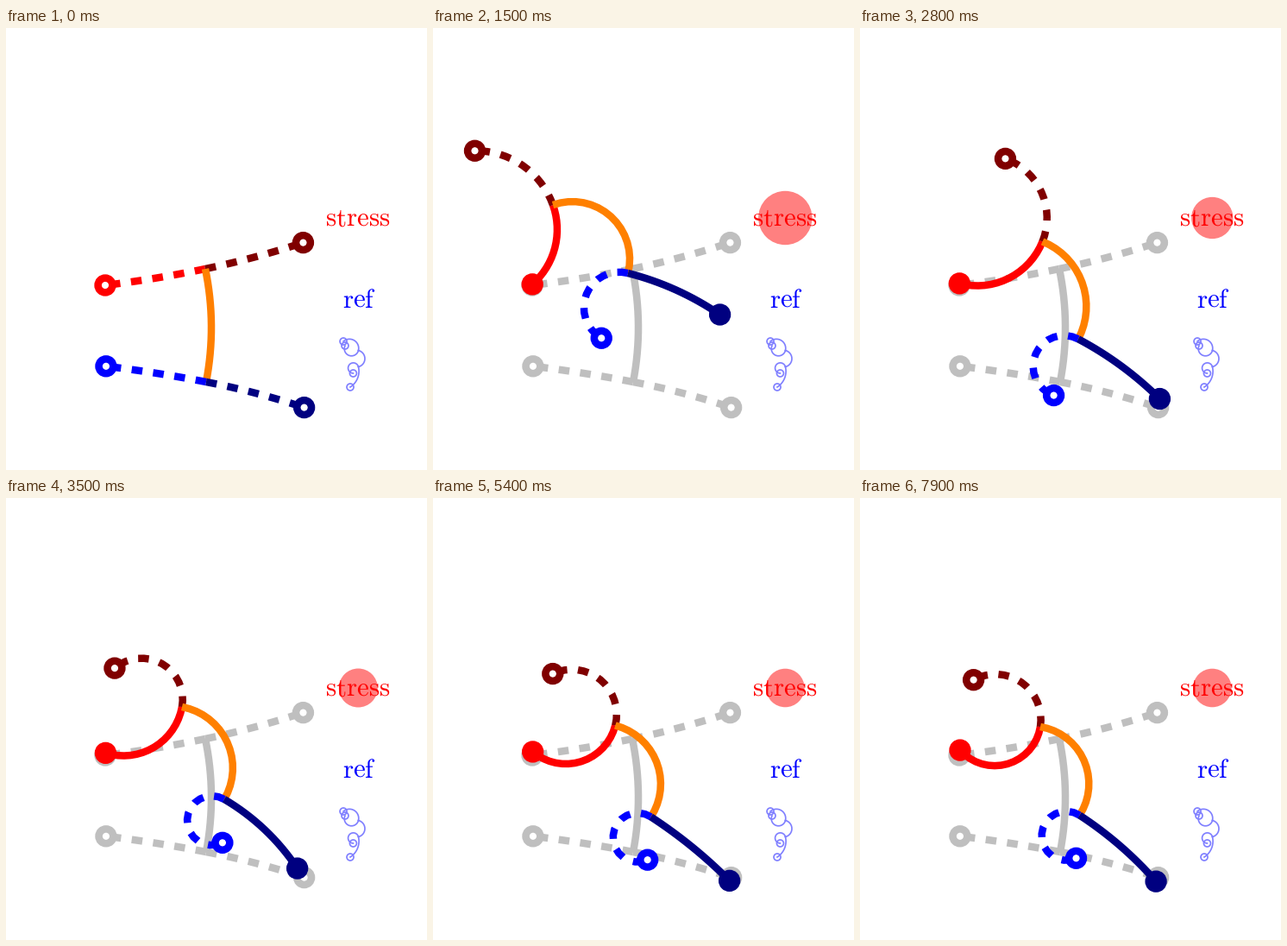
Animation, 488 px wide and 512 px high, one loop 8000 ms. Source, as a matplotlib script:

```python
import numpy as np
import matplotlib.pyplot as plt
from matplotlib.animation import FuncAnimation
from matplotlib.patches import Circle

W, H, DPI = 488, 512, 100
FRAMES, STEP = 80, 100
LOOP = FRAMES * STEP
PX = 72 / DPI
LIMB, LINE = 117.5, 8.5
DASH = (0, (1.47, 1.47))
GRAY = "#bfbfbf"
plt.rcParams.update({"mathtext.fontset": "cm", "text.hinting": "none"})

# Key poses: shoulder x, y, hip x, y, then the bends in degrees of the
# spine, front right, rear left and rear right limbs.
KEYS = {
    0: (231, 279, 232, 410, 22.7, -6.4, -4, 7.4),
    900: (228, 288, 245, 424, 55, 0, -122, 0),
    1500: (139, 205, 226, 284, 124, -71, -164, 20),
    2200: (218, 252, 253, 370, 84, -50, -148, 9),
    3500: (204, 242, 253, 349, 110, -141, -236, 26),
    4600: (212, 263, 252, 370, 107, -130, -237, 11),
    7900: (209, 265, 254.5, 367.5, 114, -128, -237, 15.6),
}
MINI = (408.5, 373.5, 408.5, 392.5, 153, -145, -255, 71)


def arc(start, angle, bend, length, n=16):
    """Points of a constant-curvature arc; angles in radians, y down."""
    s = np.linspace(0, 1, n + 1)
    turn = bend * s / 2
    chord = length * s * np.sinc(turn / np.pi)
    return (start[0] + chord * np.cos(angle + turn),
            start[1] + chord * np.sin(angle + turn))


def arc_between(start, end, angle):
    """Arc leaving start at the given angle and landing on end."""
    dx, dy = end[0] - start[0], end[1] - start[1]
    half = (np.arctan2(dy, dx) - angle + np.pi) % (2 * np.pi) - np.pi
    return arc(start, angle, 2 * half, np.hypot(dx, dy) / np.sinc(half / np.pi))


def curves(pose, pin, limb=LIMB):
    """Spine, then limbs: front left (to the pin), front right, rear pair."""
    top, hip = pose[0:2], pose[2:4]
    spine, front, rear_left, rear_right = np.radians(pose[4:])
    head = np.arctan2(hip[1] - top[1], hip[0] - top[0]) - spine / 2
    tail, q = head + spine, np.pi / 2
    return (arc_between(top, hip, head),
            [arc_between(top, pin, head + q),
             arc(top, head - q, front, limb),
             arc(hip, tail + q, rear_left, limb),
             arc(hip, tail - q, rear_right, limb)])


def pose_at(t):
    return [np.interp(t, list(KEYS), col) for col in zip(*KEYS.values())]


def pin_at(t):
    """The planted front foot creeps slowly upwards."""
    return 115 + t / LOOP, 298 - 6 * t / LOOP


def stress_at(t):
    """Disc radius: a short spike, then a plateau that settles."""
    return (22.3 + 30 * np.exp(-((t - 1150) / 190) ** 2)
            + 9 * np.exp(-(t / 2500) ** 4))


fig = plt.figure(figsize=(W / DPI, H / DPI), dpi=DPI, facecolor="white")
ax = fig.add_axes([0, 0, 1, 1])
ax.set_xlim(0, W)
ax.set_ylim(H, 0)
ax.axis("off")


class Walker:
    """Two pairs of limbs joined by a spine, with a round foot on each limb."""

    def __init__(self, spine, limbs, z):
        def line(color, dz):
            return ax.plot([], [], color=color, lw=LINE * PX, zorder=z + dz,
                           solid_capstyle="butt", dash_capstyle="butt",
                           solid_joinstyle="round")[0]

        self.colors = limbs
        self.spine = line(spine, 1)
        self.limbs = [line(c, 0 if i < 2 else 2) for i, c in enumerate(limbs)]
        self.feet = [ax.add_patch(Circle((0, 0), 8.4, ec=c, lw=LINE * PX,
                                         zorder=z + 3)) for c in limbs]

    def draw(self, t, planted=()):
        spine, limbs = curves(pose_at(t), pin_at(t))
        self.spine.set_data(*spine)
        for i, (x, y) in enumerate(limbs):
            down = i in planted
            self.limbs[i].set_data(x, y)
            self.limbs[i].set_linestyle("-" if down else DASH)
            self.feet[i].center = x[-1], y[-1]
            self.feet[i].set_facecolor(self.colors[i] if down else "white")

    def show(self, on):
        for artist in (self.spine, *self.limbs, *self.feet):
            artist.set_visible(on)


def draw_mini():
    style = dict(color="#8080ff", lw=1.7 * PX)
    spine, limbs = curves(MINI, (393, 368), limb=27)
    for x, y in (spine, *limbs):
        ax.plot(x, y, **style)
    for x, y in limbs:
        ax.add_patch(Circle((x[-1], y[-1]), 4, fill=False, **style))


def label(x, y, word, color):
    ax.text(x, y, rf"$\mathrm{{{word}}}$", color=color, fontsize=31 * PX,
            ha="center", va="baseline", zorder=30)


disc = ax.add_patch(Circle((408.3, 220), 22, fc="#ff8080", ec="none"))
ghost = Walker(GRAY, [GRAY] * 4, 5)
body = Walker("#ff8000", ["#ff0000", "#800000", "#0000ff", "#000080"], 10)
ghost.draw(0)
draw_mini()
label(408.1, 229.7, "stress", "red")
label(409.8, 324.7, "ref", "blue")


def update(i):
    t = i * STEP
    moving = i > 0
    ghost.show(moving)
    disc.set_visible(moving)
    disc.set_radius(stress_at(t))
    body.draw(t, planted=(0, 3) if moving else ())
    return []


anim = FuncAnimation(fig, update, frames=FRAMES, interval=STEP, repeat=True)
plt.show()
```
